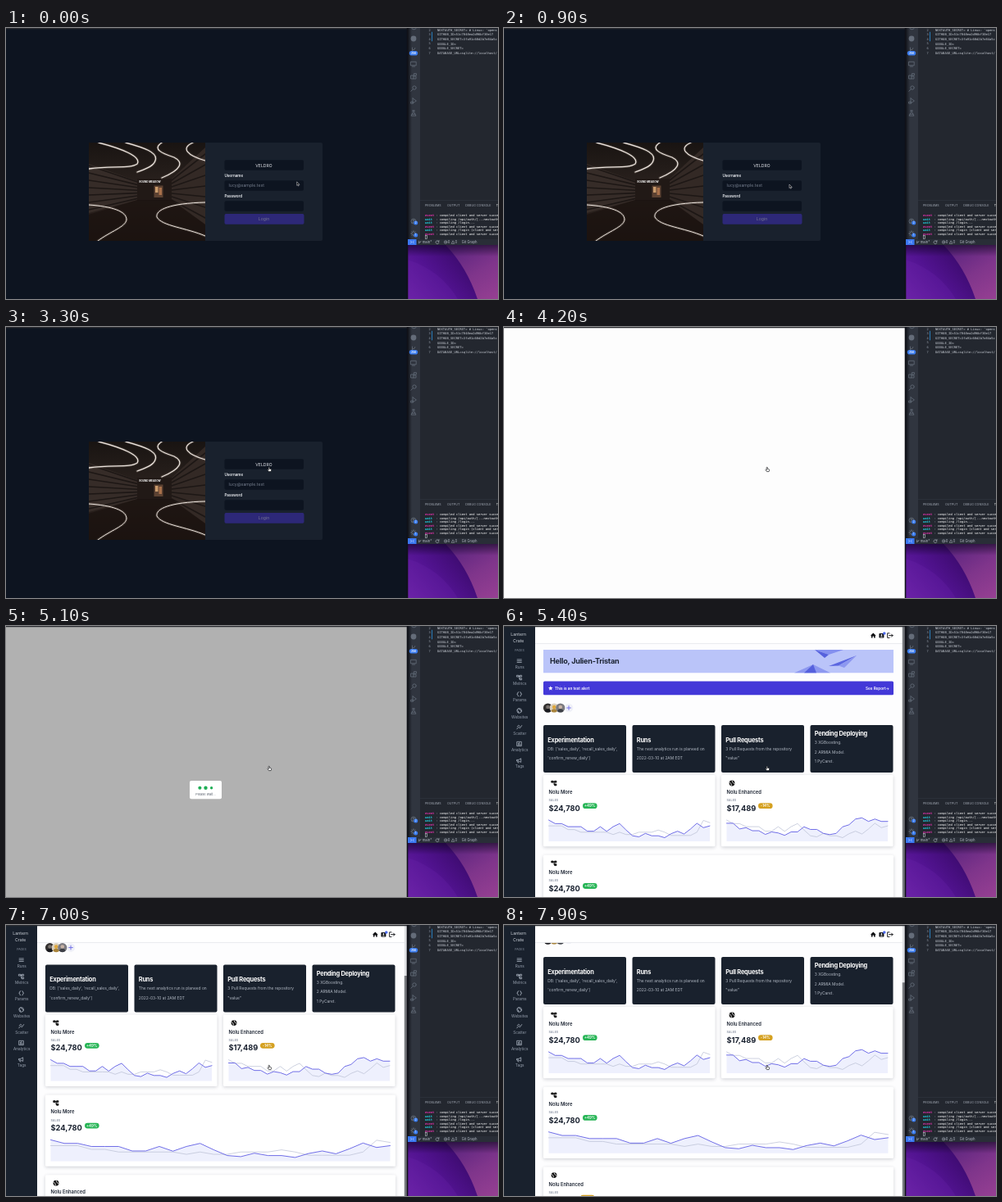
An HTML page with a canvas that plays this animation: 600x331 px, repeating every 8 s.

```html
<!DOCTYPE html>
<html lang="en">
<head>
<meta charset="utf-8">
<title>Login to dashboard</title>
<style>
html, body { margin: 0; width: 100%; height: 100%; overflow: hidden; background: #0d1420; }
canvas { display: block; width: 600px; height: 331px; }
</style>
</head>
<body>
<canvas id="stage"></canvas>
<script>
const LOOP = 8000, WHITE_AT = 3900, WAIT_AT = 4700, HOME_AT = 5300, SCROLL_AT = 6400;
const SANS = 'Inter, Roboto, sans-serif', MONO = '"DejaVu Sans Mono", monospace';
const NIGHT = '#0d1420', SLATE = '#19212d', INDIGO = '#4338d8';

const canvas = document.getElementById('stage');
const ctx = canvas.getContext('2d');
const ratio = window.devicePixelRatio || 1;
canvas.width = 600 * ratio;
canvas.height = 331 * ratio;

// Drawing helpers
function rect(x, y, w, h, fill, r = 0) {
  ctx.fillStyle = fill;
  ctx.beginPath();
  ctx.roundRect(x, y, w, h, r);
  ctx.fill();
}
function dot(x, y, r, fill) {
  ctx.fillStyle = fill;
  ctx.beginPath();
  ctx.arc(x, y, r, 0, 7);
  ctx.fill();
}
function path(d, fill, stroke, width = 1, x = 0, y = 0, scale = 1) {
  const p = new Path2D(d);
  ctx.save();
  ctx.translate(x, y);
  ctx.scale(scale, scale);
  ctx.lineWidth = width;
  ctx.lineJoin = ctx.lineCap = 'round';
  if (fill) { ctx.fillStyle = fill; ctx.fill(p); }
  if (stroke) { ctx.strokeStyle = stroke; ctx.stroke(p); }
  ctx.restore();
}
// y is the vertical middle of the capitals
function text(s, x, y, size, color, { weight = 400, font = SANS, align = 'left', track = 0 } = {}) {
  ctx.font = `${weight} ${size}px ${font}`;
  ctx.letterSpacing = track + 'px';
  ctx.textAlign = align;
  ctx.fillStyle = color;
  ctx.fillText(s, x, y + size * 0.36);
}
function gradient(x0, y0, x1, y1, ...colors) {
  const g = ctx.createLinearGradient(x0, y0, x1, y1);
  colors.forEach((c, i) => g.addColorStop(i / (colors.length - 1), c));
  return g;
}
function clipped(x, y, w, h, draw) {
  ctx.save();
  ctx.beginPath();
  ctx.rect(x, y, w, h);
  ctx.clip();
  draw();
  ctx.restore();
}

// Icons are drawn around 0,0
const icons = {
  branch: 'M-1.5-2V2M-1.5 1Q2 1 2-1.5',
  screen: 'M-3.2-2.7H3.2V1.8H-3.2ZM-1.5 3H1.5',
  blocks: 'M-3-1H0V3H-3ZM0 0H3V3H0M.8-3.4H3.4V-1H.8Z',
  search: 'M-.5 .6L-3.2 3.2M3.2-1A2.2 2.2 0 1 1-1.2-1A2.2 2.2 0 1 1 3.2-1',
  run: 'M-1-3.2L3.4 0L-1 3V-3.2M-3 1.2H-.6V3.2H-3Z',
  flask: 'M-1.2-3.2H1.2M-.8-3V-.6L-3 3.2H3L.8-.6V-3M-2 1.2H2',
  user: 'M3 0A3 3 0 1 1-3 0A3 3 0 1 1 3 0M-2 2Q0-.4 2 2M1-1A1 1 0 1 1-1-1A1 1 0 1 1 1-1',
  gear: 'M2.2 0A2.2 2.2 0 1 1-2.2 0A2.2 2.2 0 1 1 2.2 0M0-3.3V-2.2M0 3.3V2.2M-3.3 0H-2.2M3.3 0H2.2M-2.3-2.3L-1.6-1.6M2.3 2.3L1.6 1.6M2.3-2.3L1.6-1.6M-2.3 2.3L-1.6 1.6',
  list: 'M-2.6-1.8H2.6M-2.6 0H2.6M-2.6 1.8H2.6',
  nodes: 'M-2.9-2.7H-.9V-.9H-2.9ZM1-2.7H2.9V-.9H1ZM1 1H2.9V2.8H1ZM-.9-1.8H1M0-1.8V1.9H1',
  braces: 'M-1-2.6Q-2.2-2.6-2-1Q-2 0-3 0Q-2 0-2 1Q-2.2 2.6-1 2.6M1-2.6Q2.2-2.6 2-1Q2 0 3 0Q2 0 2 1Q2.2 2.6 1 2.6',
  globe: 'M2.8 0A2.8 2.8 0 1 1-2.8 0A2.8 2.8 0 1 1 2.8 0M-2.6-.9Q-.5 0-.7 2.6M-.8-2.6Q1.6-1 2.7.8',
  scatter: 'M-3 2.2L-1-.2L.8 1L3-2.2M-2.6-.8L-1-2.4L.4-1.4',
  bars: 'M-2.6-2.6H2.6V2.6H-2.6ZM-1.3 1.4V-.6M0 1.4V-1.5M1.3 1.4V.3',
  horn: 'M-2.8-.8H-.8L2-2.4V2.2L-.8.8H-2.8ZM-1.8 1V2.6H-.8'
};
function icon(name, x, y, color, width = 0.8) {
  path(icons[name], null, color, width, x, y);
}

// Right side: code editor above the wallpaper
const codeLines = [
  'NEXTAUTH_SECRET= # Linux: `opens', 'GITHUB_ID=51c7048ea2d96bf30e17',
  'GITHUB_SECRET=3fa91c60d2b7e84a5c', 'GOOGLE_ID=', 'GOOGLE_SECRET=',
  'DATABASE_URL=sqlite://localhost/'
];
const done = ['event', 'compiled client and server succe'];
const logLines = [
  done, ['wait', 'compiling /api/auth/[...nextauth'], ['wait', 'compiling /login...'],
  done, ['wait', 'compiling /login (client and ser'], done
];
function wallpaper() {
  rect(489, 265, 111, 66, gradient(490, 331, 556, 275, '#6b22a6', '#521391', '#3b0a6c'));
  path('M490 283Q530 296 551 331H490Z', 'rgba(110,36,170,.25)');
  path('M536 265Q562 292 575 331H600V265Z', gradient(555, 265, 596, 331, '#5d2580', '#7f358b', '#953f92'));
  rect(489, 265, 111, 14, gradient(0, 265, 0, 279, 'rgba(8,4,20,.55)', 'rgba(8,4,20,0)'));
}
function editor() {
  const gray = '#646c79', pale = '#b4bac5', mono = { font: MONO };
  wallpaper();
  rect(490, 0, 110, 265, '#23272f');
  rect(490, 0, 15, 258, '#30353f');
  rect(490, 0, 5, 258, gradient(490, 0, 495, 0, 'rgba(14,16,22,.85)', 'rgba(14,16,22,0)'));
  rect(488.7, 0, 1.6, 331, '#101118');

  path('M494.5 0Q497.5 4 500.5 0', null, gray, 0.8);
  dot(497, 13, 3.4, gray);
  icon('branch', 497, 26, gray);
  ['screen', 'blocks', 'search', 'run', 'flask'].forEach((n, i) => icon(n, 497, 44 + i * 15, gray));
  rect(491.8, 28, 10.4, 5.6, '#3b7df0', 2.8);
  text('256', 497, 30.8, 3.3, '#fff', { align: 'center', weight: 600 });
  icon('user', 497, 236, gray);
  icon('gear', 497, 251, gray);
  [238, 253].forEach((y, i) => {
    dot(499.7, y, 2.5, '#3b7df0');
    text(i ? '1' : '2', 499.7, y, 3, '#fff', { align: 'center' });
  });

  codeLines.forEach((s, i) => {
    const y = 2.2 + i * 5.65;
    text(String(i + 2), 515.5, y, 3.7, '#9aa1ad', mono);
    text(s, 526, y, 3.79, '#cdd2da', mono);
  });
  rect(519, 4.8, 0.9, 11.4, '#2c86c9');

  rect(505, 210.5, 95, 0.5, '#343a44');
  [['PROBLEMS', 511], ['OUTPUT', 538], ['DEBUG CONSOLE', 560.3]].forEach(([s, x]) =>
    text(s, x, 216.5, 3.65, '#a2a9b4'));
  text('TERMINAL', 597.7, 216.5, 3.65, '#fff');
  logLines.forEach(([kind, s], i) => {
    const y = 228.8 + i * 4.48;
    text(kind, 511, y, 3.72, kind === 'wait' ? '#22cfe0' : '#dd32a8', { font: MONO, weight: 700 });
    text('- ' + s, 524.4, y, 3.72, '#fff', mono);
  });
  ctx.strokeStyle = '#c5cad3';
  ctx.lineWidth = 0.6;
  ctx.strokeRect(511.3, 253.5, 2, 4);

  rect(490, 258, 110, 7, '#292e37');
  rect(490, 258, 10.5, 7, '#3b78f2');
  path('M493.4 260.3L495 261.5L493.4 262.7M497.4 260.3L495.8 261.5L497.4 262.7', null, '#c9dafb', 0.6);
  path(icons.branch, null, pale, 0.8, 504.7, 261.5, 0.7);
  text('main*', 507.7, 261.5, 4.2, pale);
  path('M527.8 260.7A2 2 0 1 0 528 262.3M528 259.6V261H526.6', null, pale, 0.6);
  path('M538 261.5A1.8 1.8 0 1 1 534.4 261.5A1.8 1.8 0 1 1 538 261.5M535.5 260.8L536.9 262.2M536.9 260.8L535.5 262.2M543.4 263L545 259.8L546.6 263Z', null, pale, 0.5);
  text('0', 538.8, 261.5, 4.2, pale);
  text('0', 547.6, 261.5, 4.2, pale);
  text('Git Graph', 555.8, 261.5, 4.2, pale);
}

// Login page
function hallPhoto() {
  rect(101, 140, 142, 120, gradient(0, 140, 0, 260, '#191412', '#2c231f', '#1f1714'));
  path('M101 166L160 187V210L101 226Z', '#362c28');
  path('M243 146L202 184V211L243 240Z', '#332925');
  for (let i = 0; i < 7; i++) {
    path(`M101 ${168 + i * 9}L160 ${188 + i * 3.4}M243 ${154 + i * 13}L202 ${186 + i * 4}`, null, '#1d1715', 1.6);
  }
  path('M160 184H202V211H160Z', '#211916');
  path('M101 228L160 210H202L243 240V260H101Z', 'rgba(26,18,15,.7)');
  rect(180.5, 192.5, 11, 14.5, '#5c4232');
  rect(182, 194, 3.5, 7, '#c99b6c');
  rect(186.5, 195, 3.5, 9, '#a8704a');
  text('ROUND MEADOW', 175.5, 187.8, 3, '#fff', { weight: 700, align: 'center' });
  const glow = (d, w) => {
    path(d, null, 'rgba(255,235,215,.13)', w + 2);
    path(d, null, '#ece4de', w);
  };
  glow('M113 140C140 147 166 157 160 166C152 172 130 168 101 172', 1.3);
  glow('M146 140C168 146 186 152 182 162C180 169 170 172 160 176', 1.3);
  glow('M190 140C178 148 190 153 205 158C217 164 214 173 190 183', 1.3);
  glow('M228 140C212 147 222 156 243 162', 1.2);
  glow('M101 216C130 218 147 224 147 234C146 243 128 248 112 260', 1);
  glow('M243 213C200 214 182 222 184 231C190 242 220 244 243 254', 1);
}
function login() {
  const mid = { align: 'center' }, bold = { weight: 600 };
  rect(0, 0, 489, 331, NIGHT);
  rect(101, 140, 285, 120, SLATE, 2);
  clipped(101, 140, 142, 120, hallPhoto);
  [161.2, 186.2, 211.2].forEach(y => rect(266.5, y, 96.5, 12.6, NIGHT, 1.8));
  text('VELDRO', 314.5, 167.7, 5.1, '#e3e6eb', mid);
  text('Username', 266.4, 180.2, 4.6, '#eef0f4', bold);
  text('lucy@sample.test', 271.6, 192.6, 5.2, '#747d8c');
  text('Password', 266.4, 205.2, 4.6, '#eef0f4', bold);
  rect(266.5, 227.1, 97, 12.6, '#2d2878', 1.8);
  text('Login', 314.5, 233.4, 5.1, '#767593', mid);
}

// Dashboard
const plus = [732, 610, 610, 504, 504, 504, 349, 349, 504, 342, 504, 610, 391, 192, 154, 273, 191, 191, 126, 263, 349, 252, 423, 622, 470, 532];
const plusBefore = [532, 532, 532, 404, 404, 314, 314, 314, 314, 314, 234, 314, 234, 234, 314, 314, 314, 388, 314, 202, 202, 202, 202, 314, 720, 642];
const advanced = [622, 622, 426, 471, 365, 365, 238, 324, 288, 206, 324, 324, 500, 409, 409, 273, 232, 273, 500, 570, 767, 808, 685, 767, 685, 685];

function chart(x, y, w, now, before) {
  const line = data => 'M' + data.map((v, i) => `${x + i * w / 25} ${y - v * 0.0355}`).join('L');
  path(`${line(now)}V${y}H${x}Z`, '#eef0fd');
  path(line(before), null, '#bcc2d6', 0.75);
  path(line(now), null, '#6a68e6', 0.95);
}
function salesCard(x, y, w, isPlus) {
  ctx.save();
  ctx.shadowColor = 'rgba(20,25,45,.2)';
  ctx.shadowBlur = 4 * ratio;
  ctx.shadowOffsetY = 1.2 * ratio;
  rect(x, y, w, 87.3, '#fff', 1.5);
  ctx.restore();
  if (isPlus) path(icons.nodes, '#111', '#111', 0.9, x + 13, y + 10);
  else {
    dot(x + 13, y + 10, 3.4, '#111');
    path('M-2.5-1Q-.3 0-.6 2.6M.2-2.7Q1 0 2.6.6', null, '#fff', 0.8, x + 13, y + 10);
  }
  text(isPlus ? 'Nolu More' : 'Nolu Enhanced', x + 6.5, y + 21, 5.8, '#1d2533', { weight: 600 });
  text('SALES', x + 6.5, y + 31, 3.7, '#8d95a5', { weight: 600 });
  text(isPlus ? '$24,780' : '$17,489', x + 6.5, y + 40.5, 9.3, '#1a2230', { weight: 700 });
  const pill = x + (isPlus ? 48 : 45);
  rect(pill, y + 34.3, 17.6, 6.8, isPlus ? '#27b556' : '#d5a121', 3.4);
  text(isPlus ? '+49%' : '-14%', pill + 8.8, y + 37.7, 4.5, '#fff', { weight: 600, align: 'center' });
  chart(x + 6.5, y + 81, w - 13, isPlus ? plus : advanced, isPlus ? plusBefore : plus);
}
function avatar(x, back, skin, shirt) {
  ctx.save();
  ctx.beginPath();
  ctx.arc(x, 100, 5.6, 0, 7);
  ctx.clip();
  rect(x - 6, 94, 12, 12, back);
  dot(x, 99, 2.3, skin);
  dot(x, 105, 3.8, shirt);
  ctx.restore();
}
const tasks = [
  ['Experimentation', "DB: ['sales_daily', 'recall_sales_daily',", "'confirm_renew_daily']"],
  ['Runs', 'The next analytics run is planeed on', '2022-03-10 at 2AM EDT'],
  ['Pull Requests', '3 Pull Requests from the repository', '"value"'],
  ['Pending Deploying', '3 XGBoosting.', '2 ARMIA Model.', '1 PyCaret.']
];
function content() {
  rect(48, 29, 427, 28.3, '#bac4f9');
  path('M354 57.3L377 47L398 57.3Z', '#8d98f0');
  path('M377 47L366 57.3H381Z', '#5661dd');
  path('M379 29H414L396 35Z', '#8490ef');
  path('M379 29L396 35L391 39Z', '#5661dd');
  path('M396 49L430 36L408 48.5Z', '#5b66e0');
  path('M430 36L415 51L408 48.5Z', '#8d98f0');
  text('Hello, Julien-Tristan', 56, 43.2, 9.1, '#1c2433', { weight: 700, track: -0.25 });

  rect(48, 67.5, 427, 16.8, INDIGO, 1.5);
  path('M0-2.8L.8-.9L2.8-.8L1.2.5L1.8 2.5L0 1.4L-1.8 2.5L-1.2.5L-2.8-.8L-.8-.9Z', '#fff', null, 1, 56.8, 76);
  text('This is an test alert', 62, 76, 4.65, '#fff', { weight: 600 });
  text('See Report→', 470, 76, 4.65, '#fff', { weight: 600, align: 'right' });

  dot(79, 100, 5.3, '#f0f1f8');
  path('M79 97.6V102.4M76.6 100H81.4', null, '#6a68e6', 0.9);
  avatar(53.5, '#33302f', '#78716d', '#191a1f');
  avatar(61.2, '#d9cfbd', '#e0a83c', '#a9843b');
  avatar(68.8, '#7c7b80', '#c7b3a6', '#3d4047');

  tasks.forEach(([title, ...lines], i) => {
    const x = 48 + i * 108.5, tall = lines.length > 2, y = tall ? 131.5 : 139;
    rect(x, 121, 101, 58, SLATE, 2);
    text(title, x + 5.3, y, 7.4, '#fff', { weight: 700, track: -0.22 });
    lines.forEach((s, j) =>
      text(s, x + 5.3, tall ? 142.7 + j * 11.4 : 150 + j * 11.6, 4.86, '#b2b9c4'));
  });

  salesCard(48, 182, 209.5, true);
  salesCard(265, 182, 209.5, false);
  salesCard(48, 279.8, 427, true);
  salesCard(48, 377.6, 427, false);
}
const pages = [
  ['Runs', 'list'], ['Metrics', 'nodes'], ['Params', 'braces'], ['Websites', 'globe'],
  ['Scatter', 'scatter'], ['Analytics', 'bars'], ['Tags', 'horn']
];
function dashboard(t) {
  const scroll = t < SCROLL_AT ? 0 : 82.5 * (1 - Math.exp((SCROLL_AT - t) / 286));
  const mid = { align: 'center' };
  rect(0, 0, 489, 331, '#fdfdfe');
  clipped(38, 21.5, 448, 309.5, () => {
    ctx.translate(0, -scroll);
    content();
  });

  rect(38, 0, 448, 21.5, '#fff');
  rect(38, 21.2, 448, 0.7, '#e3e5ea');
  path('M-3.4.1L0-3.1L3.4.1H2.4V2.9H.8V.8H-.8V2.9H-2.4V.1Z', '#0c0d10', null, 1, 450.3, 11.6);
  rect(457.4, 9, 6, 5.6, '#12141a', 0.8);
  dot(460.4, 11, 0.9, '#fff');
  path('M458.7 13.6Q460.4 11.3 462.1 13.6Z', '#fff');
  dot(463.8, 9, 1.8, '#4d6bea');
  path('M470 8.8H467.6V14.4H470M469.6 11.6H474M472.5 10L474.1 11.6L472.5 13.2', null, '#0c0d10', 0.9);

  rect(0, 0, 38, 331, SLATE);
  text('Lantern', 17.7, 10.5, 5.2, '#cfd4dc', mid);
  text('Crate', 17.7, 18, 5.2, '#cfd4dc', mid);
  text('PAGES', 19, 29.5, 3.6, '#858e9d', mid);
  pages.forEach(([label, name], i) => {
    const y = 42.7 + i * 20.25;
    icon(name, 18.7, y, '#a9b1be');
    text(label, 19.2, y + 7.5, 4.7, '#97a0ae', mid);
  });

  rect(485.8, 0, 3.2, 331, '#dfe0e3');
  rect(485.8, scroll * 0.855, 3.2, 331, '#77797e');
}

function waiting(t) {
  rect(0, 0, 489, 331, '#b1b1b1');
  rect(224, 189, 39, 22.3, '#fff', 2);
  for (let i = 0; i < 3; i++) {
    dot(236.4 + i * 7.1, 197.8, 1.85 + 0.4 * Math.sin(3.18 - t / 150 + 1.5 * i), '#1fae55');
  }
  text('Please wait...', 243.5, 205.8, 3.9, '#5d6470', { align: 'center' });
}

// Pointer: time, x, y
const stops = [[0, 354.7, 188.2], [500, 354.7, 188.2], [1700, 328.7, 200.3], [2100, 328.7, 200.3], [3200, 321, 171.5], [LOOP, 321, 171.5]];
function pointer(t) {
  const i = stops.findIndex(s => s[0] > t);
  const [t0, x0, y0] = stops[i - 1], [t1, x1, y1] = stops[i];
  let k = (t - t0) / (t1 - t0);
  k *= k * (3 - 2 * k);
  const x = x0 + (x1 - x0) * k, y = y0 + (y1 - y0) * k;
  if (y > 174) path('M0 0V4.6L1.1 3.7L1.9 5.4L2.7 5L1.9 3.4H3.3Z', '#0a0a0a', '#d5d7db', 0.6, x, y, 0.9);
  else path('M-.8 0Q-.1-.7.4 0V1.8L2.1 2.1Q2.8 2.3 2.6 3.3L2.1 5.1H-.6L-2 3Q-1.9 2.1-.8 2.8Z', '#fff', '#15161a', 0.65, x, y);
}

const start = performance.now();
function frame() {
  const t = (performance.now() - start) % LOOP;
  ctx.setTransform(ratio, 0, 0, ratio, 0, 0);
  if (t < WHITE_AT) login();
  else if (t < WAIT_AT) rect(0, 0, 489, 331, '#fdfdfd');
  else if (t < HOME_AT) waiting(t);
  else dashboard(t);
  rect(0, 0, 489, 1.2, '#2b2c31');
  editor();
  pointer(t);
  requestAnimationFrame(frame);
}
frame();
</script>
</body>
</html>
```
